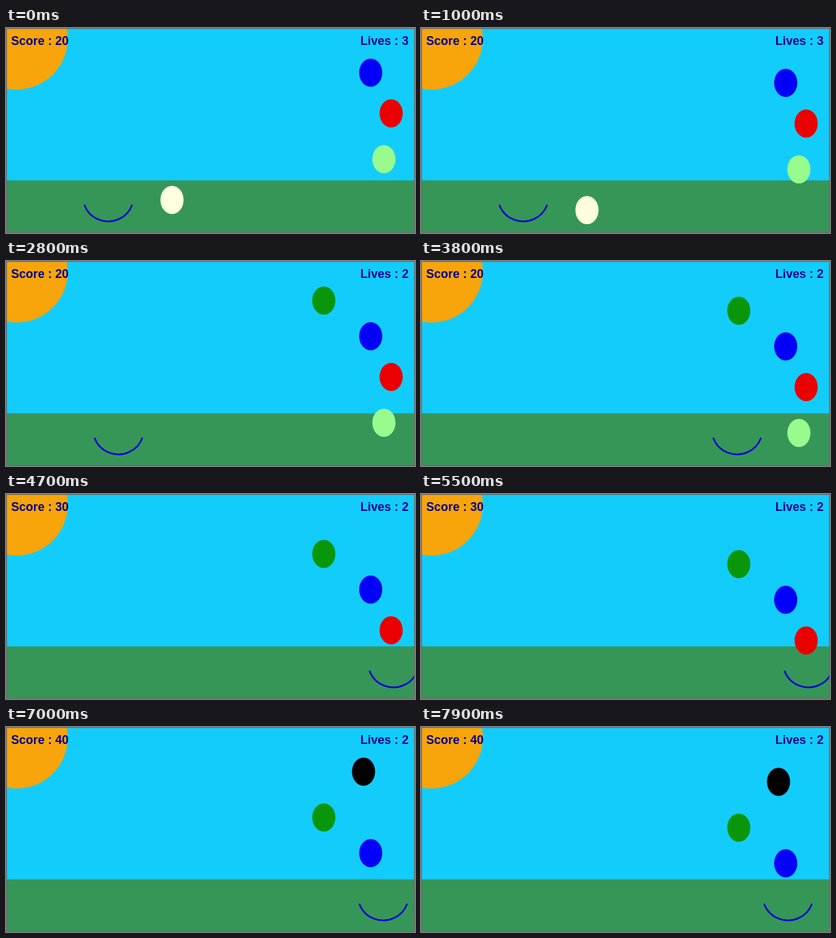
Write an HTML page with a canvas that moves like this. It is 600 by 302 pixels and loops after 8 s.

```html
<!DOCTYPE html>
<html lang="en">
<head>
<meta charset="utf-8">
<title>Egg catcher</title>
<style>
  html, body { margin: 0; width: 600px; height: 302px; overflow: hidden; }
  canvas { display: block; }
</style>
</head>
<body>
<canvas width="600" height="302"></canvas>
<script>
const ctx = document.querySelector('canvas').getContext('2d');
const LOOP = 8000, DROP = 7.5, STRIDE = 14.94;
const FIRST_CATCH = 4000, SECOND_CATCH = 6550, LOST = 2095;

// x, y at step 0, visible from, visible until
const eggs = [
  { x: 243.5, y: 253.3, color: '#ffffe0', from: 0, to: LOST },
  { x: 554.4, y: 193.3, color: '#98fb8e', from: 0, to: FIRST_CATCH },
  { x: 565, y: 125.8, color: '#eb0000', from: 0, to: SECOND_CATCH },
  { x: 535, y: 65.8, color: '#0000fa', from: 0, to: LOOP },
  { x: 466.2, y: 13.3, color: '#0a960a', from: 2530, to: LOOP },
  { x: 524.5, y: -54.2, color: '#000', from: 6130, to: LOOP }
];

// The eggs fall in steps, which come faster after each catch.
function fallSteps(t) {
  if (t < 4350) return Math.floor((t + 160) / 451);
  if (t < 6918) return 10 + Math.floor((t - 4350) / 428);
  return 16 + Math.floor((t - 6918) / 407);
}

// One key press, then key repeat to the right edge, then two taps back.
function catcherSteps(t) {
  if (t < 2750) return 0;
  const repeats = Math.floor((t - 3215) / 29);
  return 1 + Math.max(0, Math.min(27, repeats)) - (t >= 7000) - (t >= 7500);
}

function ellipse(x, y, rx, ry, color) {
  ctx.fillStyle = color;
  ctx.beginPath();
  ctx.ellipse(x, y, rx, ry, 0, 0, 2 * Math.PI);
  ctx.fill();
}

function label(text, x, align) {
  ctx.font = 'bold 17.7px "Liberation Sans", Arial, sans-serif';
  ctx.fillStyle = '#00008b';
  ctx.textAlign = align;
  ctx.fillText(text, x, 24.8);
}

function pointer(x, y) {
  ctx.beginPath();
  [[0, 0], [0, 10], [2.3, 8], [4, 11.6], [5.6, 10.8], [4, 7.4], [7, 7.2]]
    .forEach(([dx, dy]) => ctx.lineTo(x + dx, y + dy));
  ctx.closePath();
  ctx.fillStyle = '#fff';
  ctx.fill();
  ctx.strokeStyle = '#222';
  ctx.lineWidth = 0.8;
  ctx.stroke();
}

function draw(t) {
  ctx.fillStyle = '#12cdfb';
  ctx.fillRect(0, 0, 600, 302);
  ctx.fillStyle = '#369658';
  ctx.fillRect(0, 224.5, 600, 78);
  ellipse(15.5, 15.5, 75.2, 75.2, '#f7a50a');

  ctx.strokeStyle = '#0000d2';
  ctx.lineWidth = 2.3;
  ctx.beginPath();
  ctx.arc(150 + STRIDE * catcherSteps(t), 247.5, 37.4, Math.PI / 9, Math.PI * 8 / 9);
  ctx.stroke();

  label('Score : ' + (20 + 10 * (t >= FIRST_CATCH) + 10 * (t >= SECOND_CATCH)), 7.4, 'left');
  label('Lives : ' + (t < LOST ? 3 : 2), 590.5, 'right');

  const fall = DROP * fallSteps(t);
  for (const e of eggs)
    if (t >= e.from && t < e.to) ellipse(e.x, e.y + fall, 17, 20.8, e.color);

  if (t >= 1850 && t < 2350) pointer(261.5, 112.5);

  ctx.strokeStyle = '#6c6c6c';
  ctx.lineWidth = 1.5;
  ctx.strokeRect(0.6, 0.6, 598.8, 300.9);
}

function frame() {
  draw(performance.now() % LOOP);
  requestAnimationFrame(frame);
}
frame();
</script>
</body>
</html>
```
